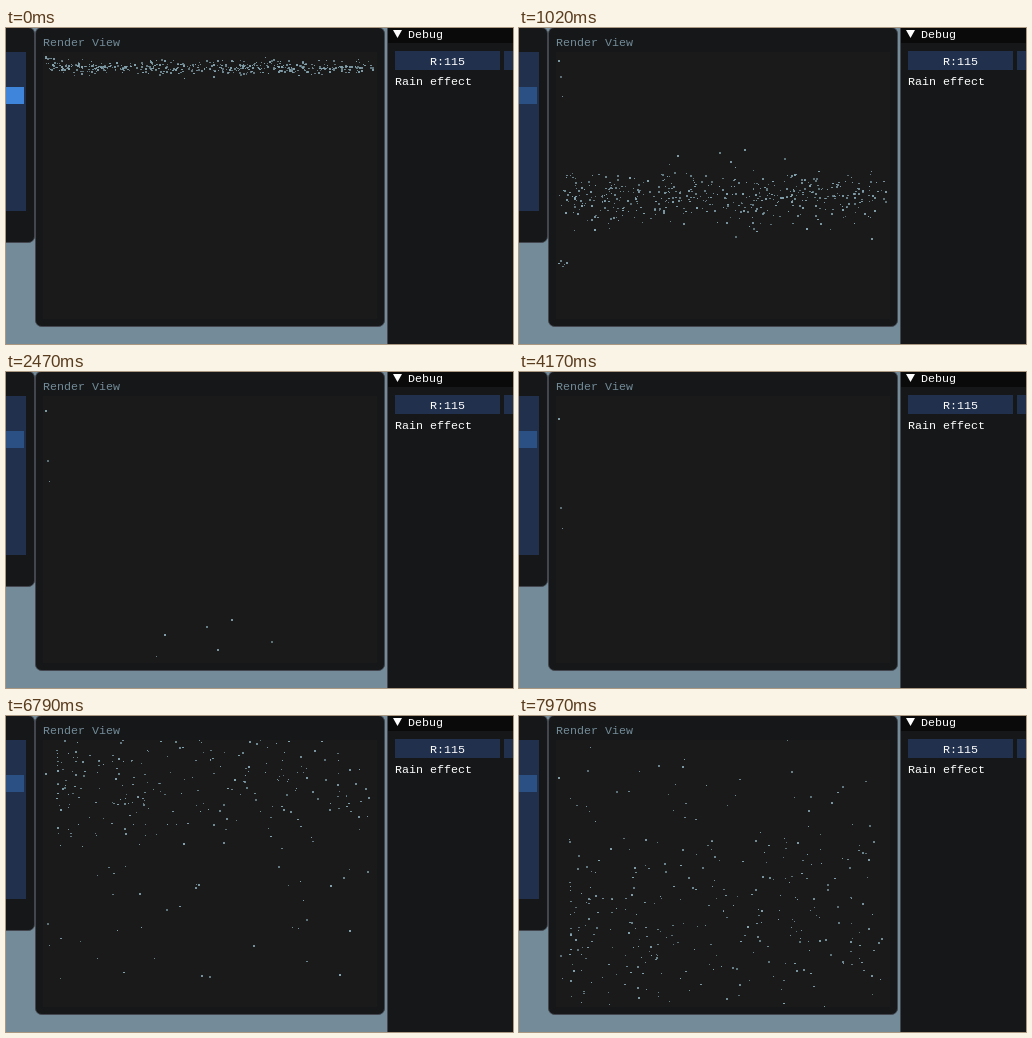
An HTML page with a canvas that plays this animation: 507 px wide and 316 px high, repeating every 8 s.

```html
<!DOCTYPE html>
<html lang="en">
<head>
<meta charset="utf-8">
<title>Rain effect</title>
<style>
  html, body { margin: 0; width: 100%; height: 100%; overflow: hidden; background: #748c99; }
  svg, canvas { position: absolute; left: 0; top: 0; width: 507px; height: 316px; display: block; }
  text { font: 11.667px "Liberation Mono", monospace; fill: #fff; white-space: pre; }
  .window { fill: #151719; stroke: #43464f; }
  .field { fill: #20304d; }
  .item { fill: #2a5084; animation: press 8s step-end infinite; }
  @keyframes press { 0% { fill: #3f85dc; } 1.5% { fill: #2a5084; } }
</style>
</head>
<body>
<svg viewBox="0 0 507 316">
  <rect class="window" x="-40.5" y="-.5" width="69" height="215" rx="6"/>
  <rect class="field" x="-10" y="24" width="30" height="159"/>
  <rect class="item" x="-10" y="59" width="28" height="17"/>

  <rect class="window" x="29.5" y="-.5" width="349" height="299" rx="6"/>
  <rect x="37" y="24" width="334" height="267" fill="#1a1a1a"/>
  <text x="37" y="18" style="fill:#738c99">Render View</text>

  <rect class="window" x="381.5" y="-10.5" width="160" height="350"/>
  <rect x="382" y="0" width="125" height="15" fill="#0a0a0a"/>
  <path d="M387 2h9l-4.5 8z" fill="#fff"/>
  <text x="402" y="10">Debug</text>
  <rect class="field" x="389" y="23" width="105" height="19"/>
  <rect class="field" x="498" y="23" width="20" height="19"/>
  <text x="424" y="37">R:115</text>
  <text x="389" y="57">Rain effect</text>
</svg>
<canvas id="rain" width="507" height="316"></canvas>
<script>
const LOOP = 8;
const LEFT = 39, WIDTH = 328, TOP = 24, BOTTOM = 291;
const ctx = document.getElementById("rain").getContext("2d");

let seed = 20731;
function random() {
  seed = (seed + 0x6D2B79F5) | 0;
  let n = Math.imul(seed ^ (seed >>> 15), 1 | seed);
  n = (n + Math.imul(n ^ (n >>> 7), 61 | n)) ^ n;
  return ((n ^ (n >>> 14)) >>> 0) / 4294967296;
}
const normal = () => Math.sqrt(-2 * Math.log(1 - random())) * Math.cos(2 * Math.PI * random());
const between = (low, high) => low + (high - low) * random();
const times = (count, action) => { for (let i = 0; i < count; i++) action(i); };

// Each drop falls at constant speed and passes height y at the given time.
const drops = [];
function addDrop(x, y, speed, time = 0) {
  const size = random();
  drops.push({
    x: Math.round(x),
    start: y - speed * time,
    speed,
    w: size < 0.45 ? 1 : 2,
    h: size < 0.7 ? 1 : 2,
    alpha: between(0.6, 1)
  });
}

// First shower: a thin band that spreads as it falls.
times(490, () => {
  const speed = 127 + 14 * normal();
  if (speed > 104) addDrop(between(LEFT, LEFT + WIDTH), 39 + 3.4 * normal(), speed);
});
times(10, i => addDrop(210 + 35 * normal(), 32, 87 + 3 * i));
times(5, i => addDrop(LEFT + 2 * i, 30, between(188, 205)));

// Three slow drops along the left edge.
addDrop(39, 28, 4.2);
addDrop(41, 20, 27.5);
addDrop(43, 40, 27.8);

// Second shower: a sparse fast front, then the main body, denser on the left.
times(40, () => {
  const depth = 146 * random() ** 2;
  addDrop(between(48, 362), TOP + depth, 165 + 0.35 * depth, 6.03);
});
times(345, () => {
  const side = random() ** 1.4;
  const y = random() < 0.08 ? between(20, 150) : 228 - 40 * side + 58 * normal();
  const speed = 125 + 0.2 * (y - 205) + 4 * normal();
  if (y - 1.94 * speed < TOP) addDrop(50 + 315 * side, y, speed, 7.97);
});

function draw(now) {
  const t = (now / 1000) % LOOP;
  ctx.clearRect(0, 0, 507, 316);
  ctx.fillStyle = "#86a5b1";
  for (const { x, start, speed, w, h, alpha } of drops) {
    const y = Math.round(start + speed * t);
    if (y < TOP || y + h > BOTTOM) continue;
    ctx.globalAlpha = alpha;
    ctx.fillRect(x, y, w, h);
  }
  requestAnimationFrame(draw);
}
draw(0);
</script>
</body>
</html>
```
